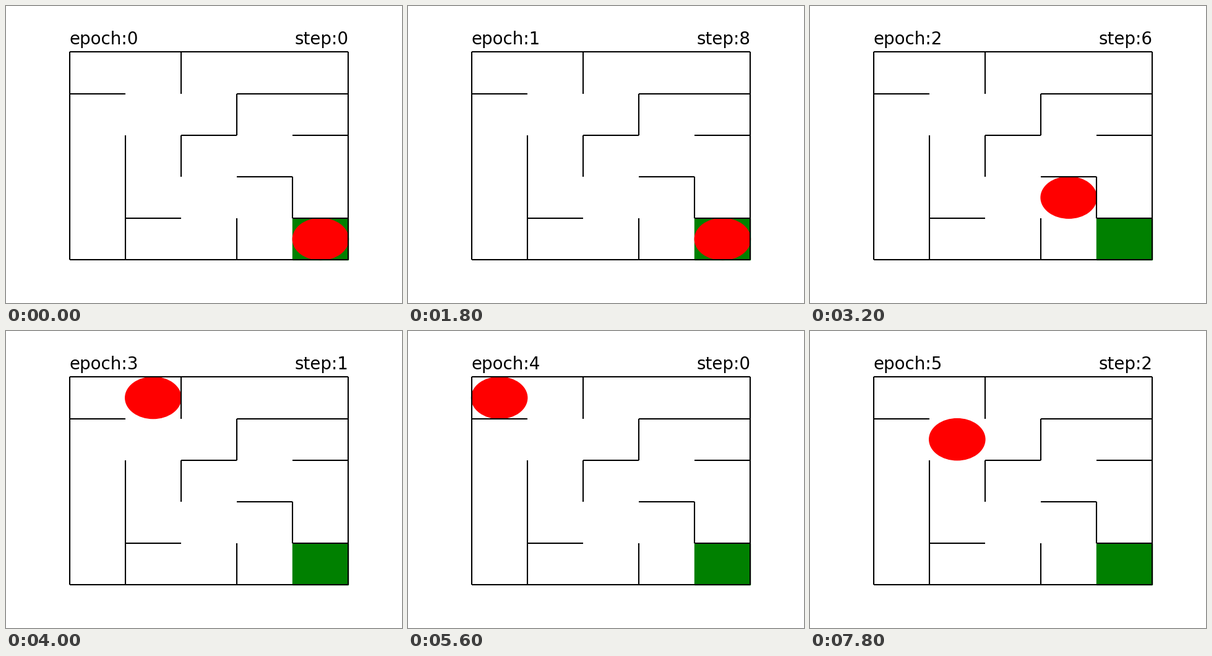
Write a matplotlib script that moves like this. It is 640 px wide and 480 px high and loops after 8 s.

```python
from itertools import accumulate

import matplotlib.pyplot as plt
from matplotlib.animation import FuncAnimation
from matplotlib.collections import LineCollection
from matplotlib.patches import Ellipse, Rectangle

STEP_MS = 200
FRAMES = 40
SIZE = 5
MARGIN = 0.05 * SIZE
LABEL_Y = SIZE + 0.185
MOVES = {"N": (0, 1), "E": (1, 0), "S": (0, -1), "W": (-1, 0)}


def trace(x, y, moves):
    """Points visited when walking unit moves from (x, y)."""
    return list(accumulate((MOVES[m] for m in moves),
                           lambda p, d: (p[0] + d[0], p[1] + d[1]),
                           initial=(x, y)))


border = trace(0, 0, "".join(side * SIZE for side in "NESW"))
walls = [
    border,
    trace(2, 5, "S"),
    trace(0, 4, "E"),
    trace(5, 4, "WWSWS"),
    trace(4, 3, "E"),
    trace(1, 3, "SSS"),
    trace(1, 1, "E"),
    trace(3, 2, "ESE"),
    trace(3, 1, "S"),
]
path = trace(0.5, SIZE - 0.5, "ESSSEESE")
goal = path[-1]

fig = plt.figure(figsize=(6.4, 4.8), dpi=100, facecolor="white")
ax = fig.add_subplot()
ax.axis("off")
ax.set_xlim(-MARGIN, SIZE + MARGIN)
ax.set_ylim(-MARGIN, SIZE + MARGIN)

segments = [pair for wall in walls for pair in zip(wall, wall[1:])]
ax.add_collection(LineCollection(segments, colors="black", linewidths=1.5))
ax.add_patch(Rectangle((goal[0] - 0.5, goal[1] - 0.5), 1, 1, color="green"))
ball = ax.add_patch(Ellipse(goal, 1, 1, color="red"))

epoch_label = ax.text(0, LABEL_Y, "", size=20, ha="left")
step_label = ax.text(SIZE, LABEL_Y, "", size=20, ha="right")


def update(frame):
    # The loop opens on the goal, then every epoch replays the path.
    lap, step = divmod(frame - 1, len(path))
    ball.set_center(path[step])
    epoch_label.set_text(f"epoch:{lap + 1}")
    step_label.set_text(f"step:{step if frame else 0}")
    return ball, epoch_label, step_label


anim = FuncAnimation(fig, update, frames=FRAMES, interval=STEP_MS,
                     repeat=True, repeat_delay=0)
plt.show()
```
